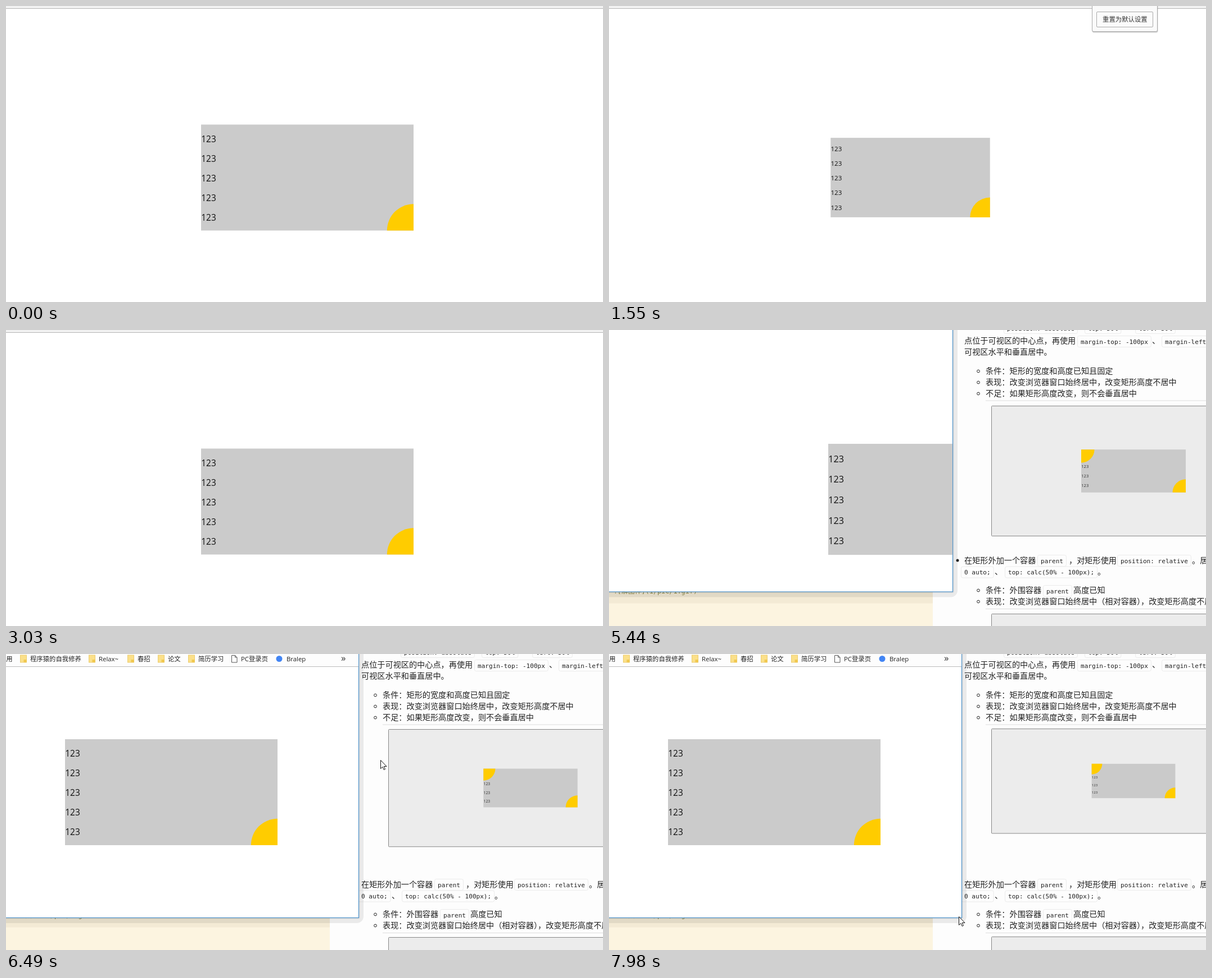
Recreate the animation shown at these times as an HTML page. Size 1062 by 528 pixels, loop 8000 ms.

```html
<!DOCTYPE html>
<html lang="zh-CN">
<head>
<meta charset="utf-8">
<title>Centred rectangle</title>
<style>
  html, body { margin: 0; width: 100%; height: 100%; overflow: hidden; background: #fff; }
  svg { display: block; font-family: "Open Sans", "Noto Sans CJK SC", "Noto Sans CJK", sans-serif; }
  text { white-space: pre; }
  .mono { font-family: "DejaVu Sans Mono", "Noto Sans CJK SC", monospace; }
</style>
</head>
<body>
<svg id="stage" width="1062" height="528" viewBox="0 0 1062 528"></svg>
<script>
const LOOP = 8000;
const stage = document.getElementById('stage');

// Every list holds [start time, values...]; the last started entry is current.
const zooms = [[0, 1], [500, .9], [910, .8], [1550, .75], [2220, .8], [2470, .9], [3030, 1]];
const popups = [[0, 0], [500, .7], [650, 1], [3030, 0]];
const windows = [[0, ''], [5440, 'opening'], [5560, 'settling'], [5700, 'open']];
const labels = [[0, 0], [5560, 1], [6360, 0]];
const demos = [[0, 0], [6490, 1], [7440, 2]];
const cursors = [[0], [6490, 666, 189], [6640, 615, 255], [6780, 606, 330], [6910, 592, 410],
  [7040, 588, 445], [7170, 621, 461], [7320, 622, 466], [7590, 617, 466, 'resize'],
  [7730, 617, 467, 'resize'], [7980, 622, 468]];
const current = (list, t) => list.filter(entry => entry[0] <= t).pop().slice(1);

const rect = (x, y, w, h, fill, more = '') =>
  `<rect x="${x}" y="${y}" width="${w}" height="${h}" fill="${fill}" ${more}/>`;
const path = (d, fill, more = '') => `<path d="${d}" fill="${fill}" ${more}/>`;
const text = (x, y, size, str, fill = '#222', more = '') =>
  `<text x="${x}" y="${y}" font-size="${size}" fill="${fill}" ${more}>${str}</text>`;
const group = (transform, ...parts) => `<g transform="${transform}">${parts.join('')}</g>`;

// Text helpers take the vertical middle of the line.
const prose = (x, mid, str) => text(x, mid + 5.2, 14.17, str);
const chip = (x, mid, str) =>
  rect(x - 5.5, mid - 9.5, str.length * 6.66 + 11, 20, '#fdfdfd', 'rx="3" stroke="#ebebeb"') +
  text(x, mid + 4.5, 11.07, str, '#222', 'class="mono"');
const bullet = (mid, str) =>
  `<circle cx="657" cy="${mid + .5}" r="2.4" fill="none" stroke="#222"/>` + prose(670, mid, str);

function card() {
  const rows = [26, 61, 96, 131, 166].map(y => text(.3, y + 5.2, 15.4, '123', '#111'));
  return rect(0, 0, 378, 189, '#cbcbcb') + rows.join('') +
    path('M378 189h-47.2A47.2 47.2 0 0 1 378 141.8z', '#fc0');
}

function popup(opacity) {
  return `<g opacity="${opacity}">` +
    rect(859.5, -6, 117, 53.5, '#999', 'rx="3" opacity=".5"') +
    rect(859.5, -6, 116, 51.5, '#fafafa', 'rx="2.5" stroke="#aaa"') +
    rect(867.5, 10.5, 100, 27, '#fbfbfb', 'rx="1.5" stroke="#aaa"') +
    text(878, 28.2, 11.4, '重置为默认设置', '#333') + '</g>';
}

function fullPage(zoom, popupOpacity) {
  return rect(0, 0, 1062, 4, '#f2f2f2') + rect(0, 4, 1062, 1, '#b4b4b4') +
    group(`translate(${536 - 189 * zoom} ${306 - 94.5 * zoom}) scale(${zoom})`, card()) +
    (popupOpacity ? popup(popupOpacity) : '');
}

function demo(step) {
  const corner = 'h23.5A23.5 23.5 0 0 1 ';
  const box = (top, bottom) =>
    rect(680.5, top, 400, bottom - top, '#ececec', 'rx="1" stroke="#888"');
  return box(135.5 - step, 367.5 - 23.75 * step) + box(506.5 - step, 600) +
    group(`translate(933 ${251.5 - 12.5 * step}) scale(${1 - step / 10})`,
      rect(-93, -38.3, 186, 76.6, '#cacaca'),
      path(`M-93-38.3${corner}-93-14.8z`, '#fc0'),
      path('M93 38.3h-23.5A23.5 23.5 0 0 1 93 14.8z', '#fc0'),
      ...[-8, 9, 26].map(y => text(-92.8, y + 2.7, 7.6, '123', '#333')));
}

function article(step) {
  return rect(576, 0, 486, 528, '#fdfdfd') +
    chip(708, -4, 'position: absolute') + chip(852, -4, 'top: 50%') + chip(942, -4, 'left: 50%') +
    prose(632, 19, '点位于可视区的中心点，再使用') + chip(839, 20, 'margin-top: -100px') +
    prose(966, 19, '、') + chip(989, 20, 'margin-left: -200px') +
    prose(632, 39, '可视区水平和垂直居中。') +
    bullet(73, '条件：矩形的宽度和高度已知且固定') +
    bullet(93, '表现：改变浏览器窗口始终居中，改变矩形高度不居中') +
    bullet(113, '不足：如果矩形高度改变，则不会垂直居中') +
    rect(670, 125.5, 392, 1, '#ddd') +
    '<circle cx="620" cy="411" r="2.5" fill="#222"/>' +
    prose(632, 410.5, '在矩形外加一个容器') + chip(768, 411, 'parent') +
    prose(818, 410.5, '，对矩形使用') + chip(910, 411, 'position: relative') +
    prose(1037, 410.5, '。居中') +
    chip(632, 431.5, '0 auto;') + prose(686, 431, '、') +
    chip(710, 431.5, 'top: calc(50% - 100px);') + prose(869, 431, '。') +
    bullet(464, '条件：外围容器') + chip(778, 465, 'parent') + prose(826, 464, '高度已知') +
    bullet(484, '表现：改变浏览器窗口始终居中（相对容器），改变矩形高度不居中') +
    rect(670, 497, 392, 1, '#ddd') + demo(step);
}

function editor() {
  return rect(0, 0, 576, 528, '#fcf4e0') + rect(0, 460, 576, 27.5, '#f3ead5') +
    text(8, 470, 11.8, '![解图样](1/pic/1.gif)', '#8c8a4c', 'class="mono"');
}

function bookmarks() {
  const folder = x => rect(x, 2, 11, 13, '#fbe08a', 'stroke="#e8c45a" stroke-width=".8"') +
    rect(x + 6, 10, 5, 5, '#f0c850');
  const name = (x, str) => text(x, 13.2, 11.36, str);
  const folders = [[25.5, '程序猿的自我修养'], [147.5, 'Relax~'], [216.5, '春招'],
    [270.5, '论文'], [324.5, '简历学习']];
  return rect(0, 0, 627, 22, '#fdfdfd') + rect(0, 22, 627, 1, '#bbb') + name(-11, '应用') +
    folders.map(([x, str]) => folder(x) + name(x + 17.5, str)).join('') +
    path('M401.5 2.5h6l3.5 3.5v9h-9.5zM407.5 2.5v3.5h3.5', '#fff', 'stroke="#555"') +
    name(418, 'PC登录页') +
    '<circle cx="486" cy="8.5" r="5.5" fill="#4285f4"/>' + name(499, 'Bralep') +
    text(596, 13, 17, '»', '#333');
}

function frame(right, bottom) {
  return rect(-30, -30, right + 39, bottom + 40, '#000', 'rx="12" opacity=".075"') +
    rect(-30, -30, right + 33, bottom + 33, '#000', 'rx="4" opacity=".05"') +
    rect(-10, -10, right + 10.5, bottom + 10.5, '#fff', 'stroke="#4a90c8" stroke-width="1.2"');
}

function smallWindow(mode, label) {
  if (mode === 'opening') {
    return frame(611, 466.5) + '<clipPath id="inside"><rect width="611" height="466"/></clipPath>' +
      `<g clip-path="url(#inside)">${group('translate(390 203) scale(1.048)', card())}</g>`;
  }
  const place = mode === 'settling' ? 'translate(-12.5 -7.3) scale(1.013)' : '';
  return group(place, frame(627, 470), bookmarks(), group('translate(105 152)', card()),
    label ? text(527, 40, 14, '706px × 474px', '#777') : '');
}

function cursor(x, y, kind) {
  const shape = kind === 'resize'
    ? 'M.5 4.5l4-4v3h13v-3l4 4-4 4v-3h-13v3z'
    : 'M.5.5v15l3.4-3.2 2.3 5.2 2.3-1-2.3-5h4.8z';
  return group(`translate(${x} ${y})`, path(shape, '#fff', 'stroke="#111"'));
}

function draw(t) {
  const [mode] = current(windows, t);
  if (!mode) return fullPage(...current(zooms, t), ...current(popups, t));
  const pointer = current(cursors, t);
  return editor() + article(...current(demos, t)) + smallWindow(mode, ...current(labels, t)) +
    (pointer.length ? cursor(...pointer) : '');
}

let shown = '';
function tick() {
  const markup = draw(performance.now() % LOOP);
  if (markup !== shown) stage.innerHTML = shown = markup;
  requestAnimationFrame(tick);
}
tick();
</script>
</body>
</html>
```
